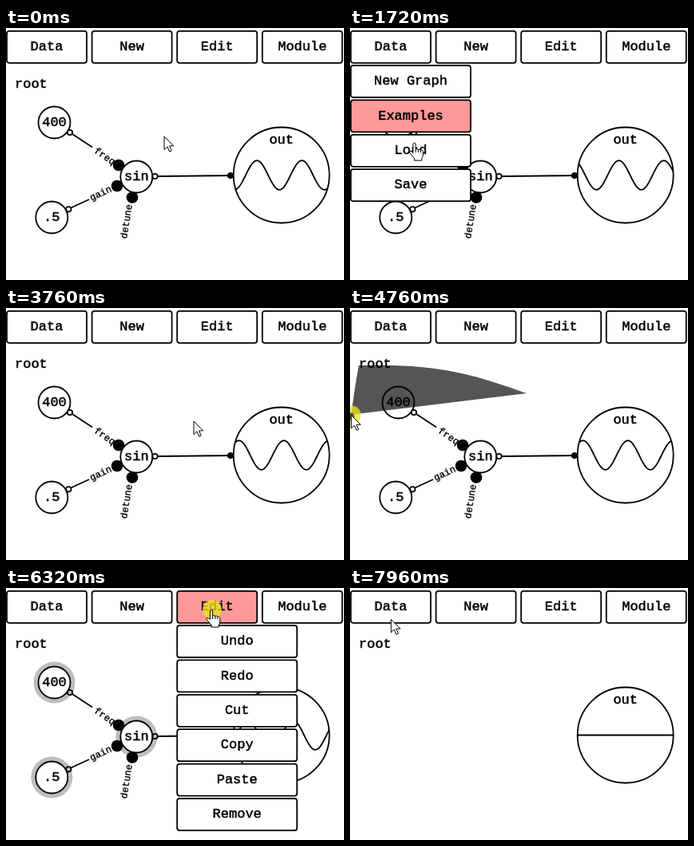
An HTML page with a canvas for the animation above (8000 ms loop, 423x316 px).

```html
<!DOCTYPE html>
<html lang="en">
<head>
<meta charset="utf-8">
<title>Audio graph editor</title>
<style>
  html, body { margin: 0; width: 100%; height: 100%; overflow: hidden; background: #fff; }
  canvas { display: block; }
</style>
</head>
<body>
<canvas id="stage" width="423" height="316"></canvas>
<script>
const ctx = document.getElementById('stage').getContext('2d');
const W = 423, H = 316, LOOP = 8000, HOVER_LAG = 80, TAU = Math.PI * 2;
const MONO = '"Liberation Mono", "Courier New", monospace';

const DATA_OPEN = 900, DATA_CLOSE = 2240;
const LASSO_START = 4320, LASSO_DRAWN = 5640, LASSO_END = 5760, LASSO_BOW = 12;
const EDIT_OPEN = 6300, REMOVED = 7240;
const CLICKS = [DATA_OPEN, DATA_CLOSE, EDIT_OPEN, REMOVED];

// Each move eases out from the previous resting point
const REST = { x: 198, y: 136 };
const MOVES = [
  { from: 100, to: 700, x: 50, y: 27 },
  { from: 1360, to: 2156, x: 95, y: 194 },
  { from: 2300, to: 2680, x: 168, y: 175 },
  { from: 3200, to: 3640, x: 235, y: 142 },
  { from: 4080, to: LASSO_START, x: 221, y: 107 },
  { from: LASSO_START, to: 4680, x: 11, y: 72, bow: LASSO_BOW },
  { from: 4680, to: 5200, x: 11, y: 289, bow: LASSO_BOW },
  { from: 5200, to: LASSO_DRAWN, x: 226.5, y: 216, bow: LASSO_BOW },
  { from: 5780, to: 6160, x: 258, y: 27 },
  { from: 6410, to: 7110, x: 254, y: 289 },
  { from: 7520, to: 8100, x: 39, y: 24 }
];

const column = (x, labels) => labels.map((label, i) =>
  ({ label, x, y: 47 + 43.4 * i, w: 150, h: 40 }));
const BAR = ['Data', 'New', 'Edit', 'Module'].map((label, i) =>
  ({ label, x: 1 + 106.6 * i, y: 3.8, w: 100, h: 40 }));
const DATA_MENU = column(1, ['New Graph', 'Examples', 'Load', 'Save']);
const EDIT_MENU = column(214.2, ['Undo', 'Redo', 'Cut', 'Copy', 'Paste', 'Remove']);

const OUT = { x: 344.7, y: 184.5, r: 60 };
const NODES = [
  { label: '400', x: 60.5, y: 118.5 },
  { label: '.5', x: 57.3, y: 237.5 },
  { label: 'sin', x: 163.3, y: 186.5 }
];

const ramp = (t, from, to) => Math.max(0, Math.min(1, (t - from) / (to - from)));
const during = (t, from, to) => t >= from && t < to;

function cursorAt(t) {
  let { x, y } = REST;
  for (const m of MOVES) {
    if (t < m.from) break;
    const p = 1 - (1 - ramp(t, m.from, m.to)) ** 2;
    const dx = m.x - x, dy = m.y - y;
    const bow = (m.bow || 0) * Math.sin(Math.PI * p) / Math.hypot(dx, dy);
    x += dx * p - dy * bow;
    y += dy * p + dx * bow;
  }
  return { x, y };
}

function text(str, x, y, { size = 17, weight = 'normal', align = 'center', color = '#000' } = {}) {
  ctx.save();
  ctx.font = `${weight} ${size}px ${MONO}`;
  ctx.textAlign = align;
  ctx.fillStyle = ctx.strokeStyle = color;
  ctx.lineWidth = size / 35;
  ctx.fillText(str, x, y);
  if (weight === 'normal') ctx.strokeText(str, x, y);
  ctx.restore();
}

function slantedText(str, x, y, degrees) {
  ctx.save();
  ctx.translate(x, y);
  ctx.rotate(degrees * Math.PI / 180);
  text(str, 0, 3.5, { size: 12 });
  ctx.restore();
}

function disc(x, y, r, fill) {
  ctx.beginPath();
  ctx.arc(x, y, r, 0, TAU);
  ctx.fillStyle = fill;
  ctx.fill();
}

function ring(x, y, r, fill = '#fff') {
  disc(x, y, r, fill);
  ctx.stroke();
}

function line(x1, y1, x2, y2) {
  ctx.beginPath();
  ctx.moveTo(x1, y1);
  ctx.lineTo(x2, y2);
  ctx.stroke();
}

function button({ label, x, y, w, h }, hot) {
  ctx.beginPath();
  ctx.roundRect(x, y, w, h, 3);
  ctx.fillStyle = hot ? '#ff9999' : '#fff';
  ctx.fill();
  ctx.stroke();
  text(label, x + w / 2, y + 24.2);
}

function drawScope(t) {
  const { x, y, r } = OUT;
  ring(x, y, r);
  text('out', x, 144.5);
  if (t >= REMOVED) return line(x - r, y, x + r, y);
  // The wave creeps right in fifteenths of its length
  const wave = 56.25;
  const step = Math.round(t / 456 + 2 * Math.sin(t / LOOP * TAU));
  const crest = 314 + step * wave / 15;
  ctx.save();
  ctx.beginPath();
  ctx.arc(x, y, r, 0, TAU);
  ctx.clip();
  ctx.beginPath();
  for (let px = x - r; px <= x + r; px++)
    ctx.lineTo(px, y - 18.3 * Math.cos((px - crest) / wave * TAU));
  ctx.stroke();
  ctx.restore();
}

function drawGraph(t) {
  const selected = ramp(t, 5780, 6000);
  const portFill = selected > 0.5 ? '#bbb' : '#fff';
  line(80, 131, 108, 149.5);
  line(78, 227, 104, 215);
  line(187, 186, 281, 185);
  for (const n of NODES) {
    disc(n.x, n.y, 26, `rgba(190,190,190,${selected})`);
    ring(n.x, n.y, 20);
    text(n.label, n.x, n.y + 4.7);
  }
  slantedText('freq', 123.5, 161, 34);
  slantedText('gain', 118.5, 207.5, -25.5);
  slantedText('detune', 151, 242.5, -81);
  ring(80, 131, 3.2, portFill);
  ring(78.3, 227.3, 3.2, portFill);
  ring(186.5, 186, 3.2, portFill);
  disc(141, 172, 7.3, '#000');
  disc(139, 198, 7.3, '#000');
  disc(158, 212.5, 7.3, '#000');
  disc(281, 185, 4, '#000');
}

function drawLasso(t) {
  ctx.beginPath();
  for (let s = LASSO_START; s <= Math.min(t, LASSO_DRAWN); s += 20) {
    const p = cursorAt(s);
    ctx.lineTo(p.x, p.y);
  }
  ctx.fillStyle = 'rgba(0,0,0,.667)';
  ctx.fill();
}

const ARROW = new Path2D('M0 0V16.5L3.9 12.9 6.6 19 9.2 17.9 6.5 11.9H11.7Z');
const HAND = new Path2D('M-2.6 1Q-1-1 .6 1V8Q2.3 6.8 3.8 8.4 5.4 7.4 6.8 9.1 8.5 8.3 9.8 10.2V15' +
  'Q9.8 17.5 8.2 19.5V22H-1V19.5L-6.8 12.5Q-7.4 10-5.2 10.3L-2.6 12.5ZM.6 8V12M3.8 8.4V12M6.8 9.1V12');

function drawCursor({ x, y }, shape) {
  ctx.save();
  ctx.translate(x, y);
  ctx.lineWidth = 1;
  ctx.fillStyle = '#fff';
  ctx.fill(shape);
  ctx.stroke(shape);
  ctx.restore();
}

function draw(t) {
  const cursor = cursorAt(t), hover = cursorAt(t - HOVER_LAG);
  const inside = b => during(hover.x, b.x, b.x + b.w) && during(hover.y, b.y, b.y + b.h);
  const lassoing = during(t, LASSO_START, LASSO_END);
  const menu = during(t, DATA_OPEN, DATA_CLOSE) ? DATA_MENU
    : during(t, EDIT_OPEN, REMOVED) ? EDIT_MENU : [];
  const buttons = [...BAR, ...menu];

  ctx.fillStyle = '#fff';
  ctx.fillRect(0, 0, W, H);
  ctx.strokeStyle = '#000';
  ctx.lineWidth = 1.8;
  ctx.lineJoin = 'round';

  text('root', 11, 74.7, { align: 'left' });
  drawScope(t);
  if (t < REMOVED) drawGraph(t);
  if (lassoing) drawLasso(t);
  for (const b of buttons) button(b, inside(b));

  ctx.globalAlpha = Math.min(ramp(t, 2340, 2680), 1 - ramp(t, 3300, 3640));
  ctx.fillStyle = 'rgba(97,97,97,.6)';
  ctx.fillRect(0, 0, W, H);
  text('Copying...', 123, 231, { size: 40, weight: 'bold', align: 'left', color: '#fff' });
  ctx.globalAlpha = 1;

  if (lassoing || CLICKS.some(c => during(t, c - 80, c + 80)))
    disc(cursor.x, cursor.y, 12, 'rgba(240,230,30,.75)');
  if (lassoing) disc(cursor.x - 0.5, cursor.y + 1.5, 4.5, 'rgba(0,0,0,.6)');

  const overNode = t < REMOVED && NODES.some(n => Math.hypot(hover.x - n.x, hover.y - n.y) < 20);
  const pointing = !lassoing && (overNode || buttons.some(inside));
  drawCursor(cursor, pointing ? HAND : ARROW);
}

const start = performance.now();
function tick() {
  draw((performance.now() - start) % LOOP);
  requestAnimationFrame(tick);
}
tick();
</script>
</body>
</html>
```
